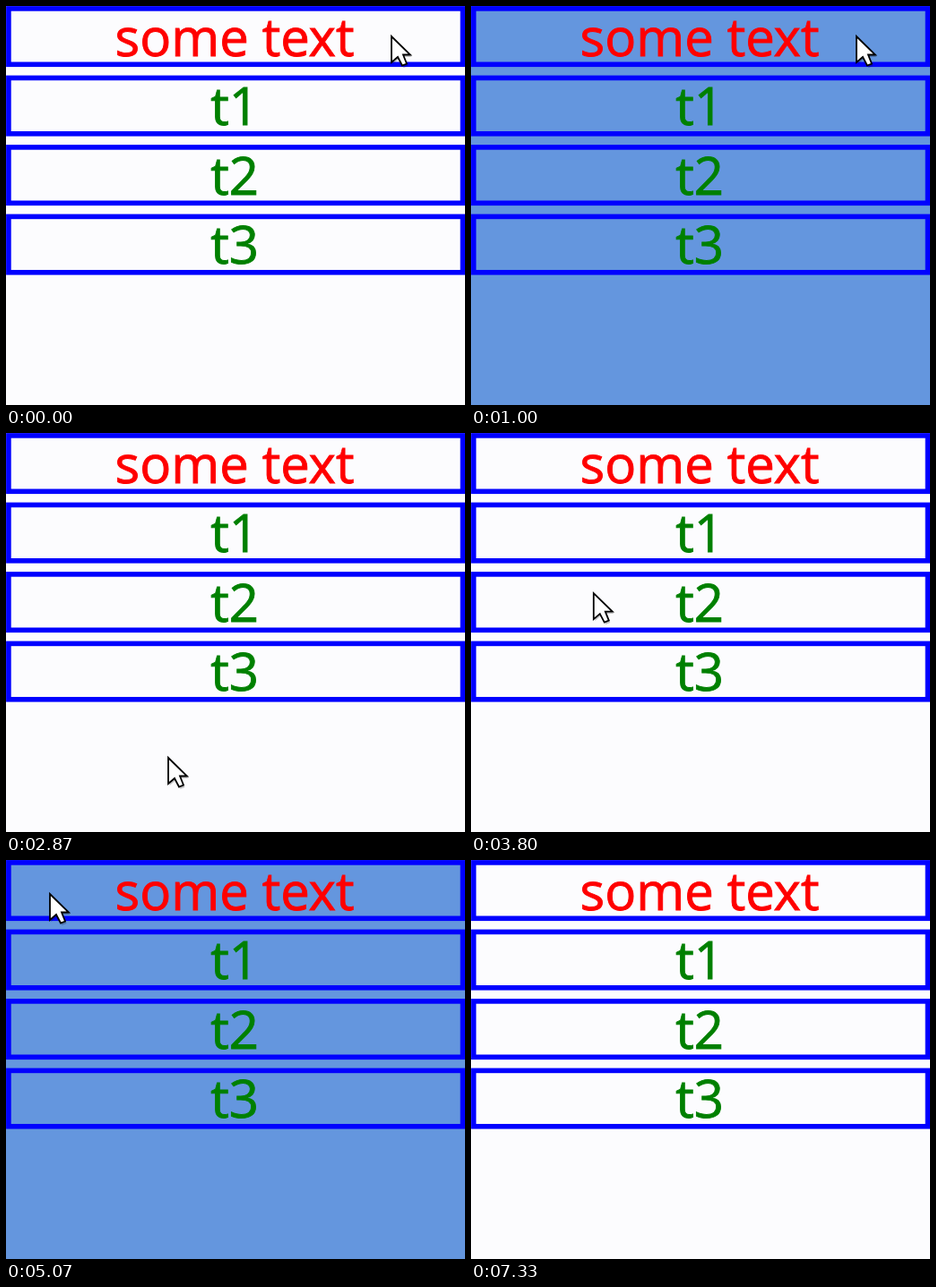
An HTML page that plays this animation: 512x446 px, repeating every 8670 ms.

```html
<!DOCTYPE html>
<html lang="en">
<head>
<meta charset="utf-8">
<title>Hover background</title>
<style>
  html, body { margin: 0; width: 100%; height: 100%; overflow: hidden; background: #fcfcfe; }
  svg { display: block; width: 100vw; height: 100vh; }
  text { font: 58px "Open Sans", "Noto Sans", sans-serif; text-anchor: middle; stroke-width: .9; }
</style>
</head>
<body>
<svg viewBox="0 0 512 446">
  <rect id="page" width="512" height="446"/>
  <g id="rows"></g>
  <g id="cursor">
    <path d="M1.5 3V32L8.5 26L13.5 36L18.5 34L14.5 24H22.5Z" opacity=".22"/>
    <path d="M0 1V30L7 24L12 33.5L17 31.5L13 21.5H21Z" fill="#fff" stroke="#000" stroke-width="1.8"/>
  </g>
</svg>
<script>
const LOOP = 8670, FPS = 15, GONE = 7330;
const WHITE = '#fcfcfe', BLUE = '#6496de';
const ROW_STEP = 77.5, ROW_HEIGHT = 68;
const $ = id => document.getElementById(id);

const labels = ['some text', 't1', 't2', 't3'];
$('rows').innerHTML = labels.map((label, i) => {
  const y = i * ROW_STEP, color = i ? '#008000' : '#f00';
  return `<rect x="2.9" y="${y + 2.9}" width="506.6" height="${ROW_HEIGHT - 5.6}" fill="none" stroke="#00f" stroke-width="5.6"/>
    <text x="255" y="${y + 55.5}" fill="${color}" stroke="${color}">${label}</text>`;
}).join('');

// pointer moves, each eased from where the last one ended
const home = { x: 430, y: 33 };
const moves = [
  { from: 1200, to: 2867, x: 181, y: 362 },
  { from: 3067, to: 4400, x: 104, y: 42 },
  { from: 4400, to: 5067, x: 49, y: 37 },
  { from: 5067, to: 6000, x: 71, y: 371 },
  { from: 6133, to: 6600, x: 112, y: 373 },
  { from: 6733, to: GONE, x: 3, y: 367 }
];

const ease = u => u * u * (3 - 2 * u);
const clamp = u => Math.min(1, Math.max(0, u));

function pointer(t) {
  return moves.reduce((p, m) => {
    const e = ease(clamp((t - m.from) / (m.to - m.from)));
    return { x: p.x + (m.x - p.x) * e, y: p.y + (m.y - p.y) * e };
  }, home);
}

function draw(ms) {
  const step = Math.floor((ms + 4) * FPS / 1000);
  const { x, y } = pointer(step * 1000 / FPS);
  const shown = ms < GONE;
  const hover = shown && step > 0 && y < ROW_HEIGHT;
  $('page').setAttribute('fill', hover ? BLUE : WHITE);
  $('cursor').setAttribute('transform', `translate(${x.toFixed(1)} ${y.toFixed(1)})`);
  $('cursor').setAttribute('visibility', shown ? 'visible' : 'hidden');
}

const start = performance.now();
function tick() {
  draw((performance.now() - start) % LOOP);
  requestAnimationFrame(tick);
}
tick();
</script>
</body>
</html>
```
